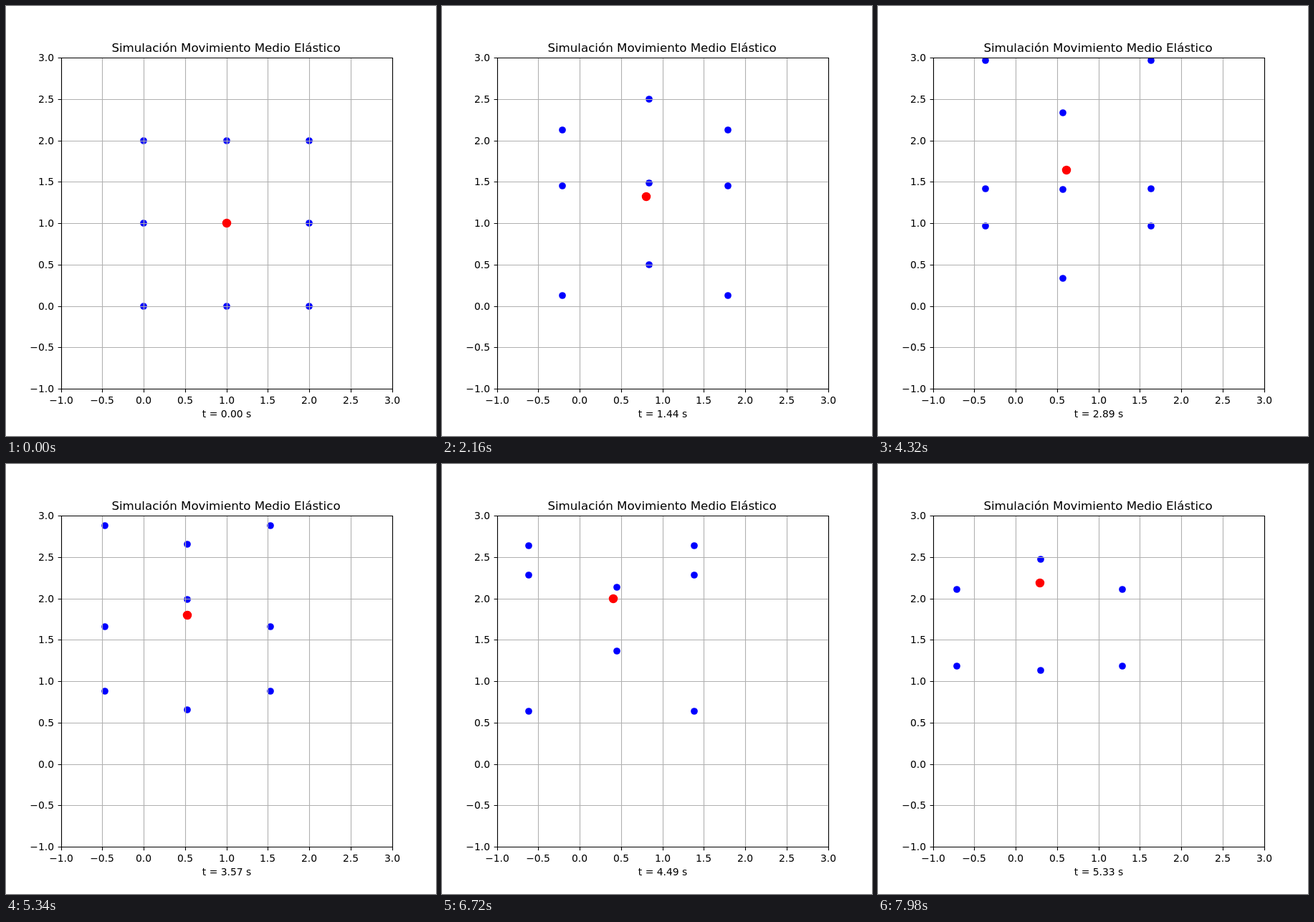
An HTML page for the animation above (8 s loop, 600 by 600 pixels).

```html
<!DOCTYPE html>
<html lang="es">
<head>
<meta charset="utf-8">
<title>Simulación Movimiento Medio Elástico</title>
<style>
  html, body { margin: 0; width: 100%; height: 100%; overflow: hidden; background: #fff; }
  svg { display: block; width: 100vw; height: 100vh; }
  text { font: 13.89px "DejaVu Sans", sans-serif; fill: #000; }
  .title { font-size: 16.67px; }
  .mid { text-anchor: middle; }
  .end { text-anchor: end; }
  path { fill: none; stroke: #000; stroke-width: 1.11; }
  .grid { stroke: #b0b0b0; }
</style>
</head>
<body>
<svg viewBox="0 0 600 600">
  <clipPath id="area"><rect x="76.5" y="72" width="462" height="462"/></clipPath>
  <g clip-path="url(#area)">
    <g id="masses" fill="#00f"></g>
    <path id="grid" class="grid"/>
    <circle id="center" r="6.25" fill="#f00"/>
  </g>
  <path id="ticks"/>
  <path d="M77.5 72.5H539.5V534.5H77.5Z"/>
  <g id="labels"></g>
  <text class="title mid" x="307" y="64">Simulación Movimiento Medio Elástico</text>
  <text id="clock" class="mid" x="308" y="574"></text>
</svg>
<script>
const LOOP = 8000, STEP = 30, DT = 10 / 499;
const UNIT = 115.5;
const DRIFT = { x: -0.1321, y: 0.2225 };
const SHAPE = [1, -2, 1]; // symmetric mode of a free chain of three masses

const $ = id => document.getElementById(id);
const px = x => Math.round(76.5 + (x + 1) * UNIT);
const py = y => Math.round(534 - (y + 1) * UNIT);

function add(parent, tag, attrs, text = "") {
  const el = document.createElementNS("http://www.w3.org/2000/svg", tag);
  for (const name in attrs) el.setAttribute(name, attrs[name]);
  el.textContent = text;
  return parent.appendChild(el);
}

function place(el, x, y) {
  el.setAttribute("cx", px(x));
  el.setAttribute("cy", py(y));
}

let grid = "", ticks = "";
for (let v = -1; v <= 3; v += 0.5) {
  const x = px(v) + 0.5, y = py(v) + 0.5;
  const label = v.toFixed(1).replace("-", "\u2212");
  grid += `M${x} 72V534M77 ${y}H539`;
  ticks += `M${x} 534.5v4.86M77.5 ${y}h-4.86`;
  add($("labels"), "text", { class: "mid", x: x - 0.5, y: 555 }, label);
  add($("labels"), "text", { class: "end", x: 67, y: y + 4.5 }, label);
}
$("grid").setAttribute("d", grid);
$("ticks").setAttribute("d", ticks);

const masses = [];
for (let row = 0; row < 3; row++)
  for (let col = 0; col < 3; col++)
    masses.push({ row, col, el: add($("masses"), "circle", { r: 4.86 }) });

// Uniform drift plus the normal modes of the 3 x 3 spring lattice (k = m = 1)
function draw(t) {
  const slow = Math.sin(Math.sqrt(3) * t), fast = Math.sin(Math.sqrt(6) * t);
  for (const { row, col, el } of masses) {
    const r = SHAPE[row], c = SHAPE[col];
    const dx = DRIFT.x * t - 0.0226 * c * slow;
    const dy = DRIFT.y * t - (0.118 * r + 0.146 * c) * slow + 0.0974 * r * c * fast;
    place(el, col + dx, row + dy);
  }
  place($("center"), 1 + DRIFT.x * t, 1 + DRIFT.y * t);
  $("clock").textContent = `t = ${t.toFixed(2)} s`;
}

const start = performance.now();
function tick() {
  const ms = (performance.now() - start) % LOOP;
  draw(Math.floor(ms / STEP) * DT);
  requestAnimationFrame(tick);
}
tick();
</script>
</body>
</html>
```
